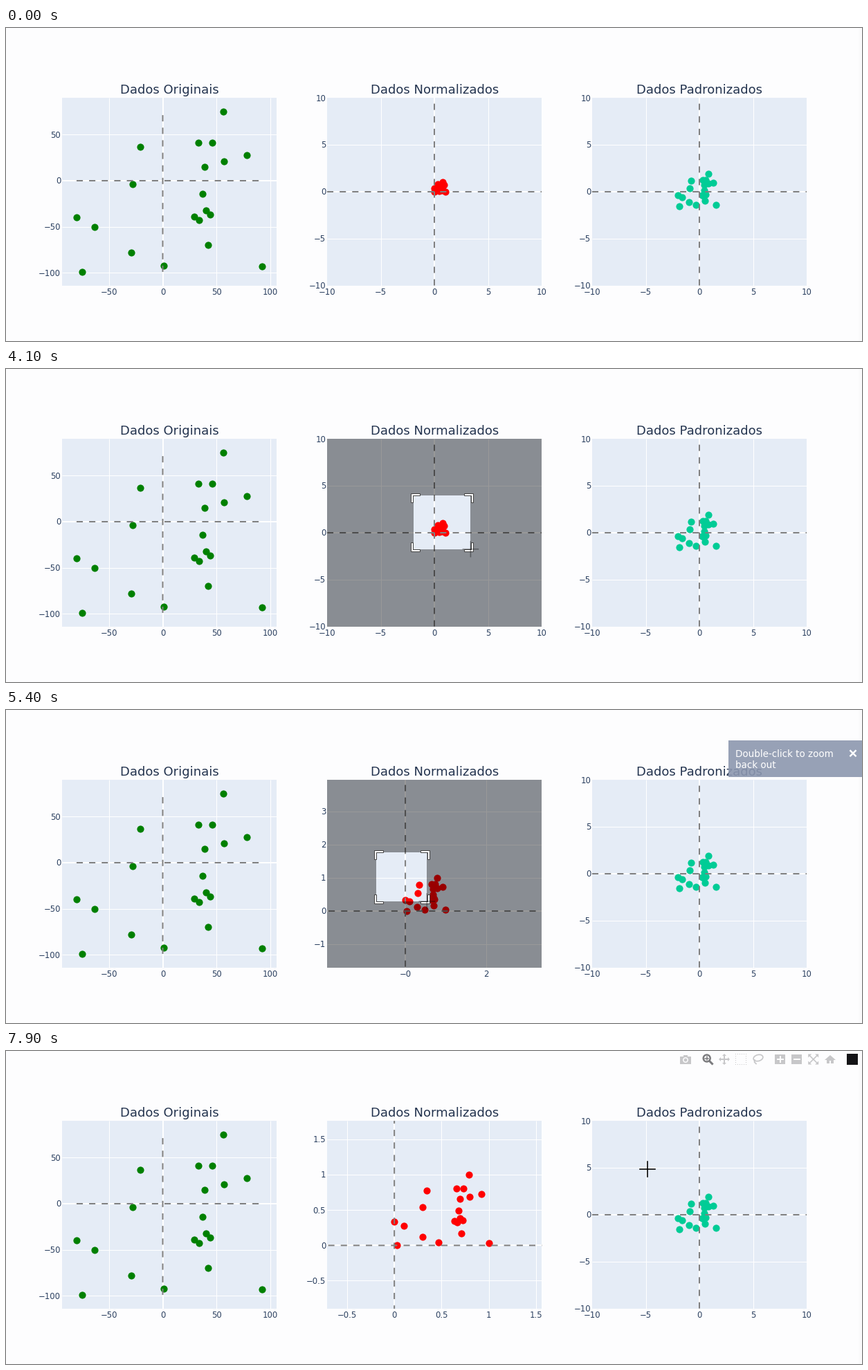
Write a matplotlib script that moves like this. It is 1237 by 453 pixels and loops after 8000 ms.

```python
import numpy as np
import matplotlib.pyplot as plt
from matplotlib.animation import FuncAnimation
from matplotlib.patches import Circle, Ellipse, PathPatch, Polygon, Rectangle
from matplotlib.path import Path

W, H, DPI = 1237, 453, 100
STEP, FRAMES = 100, 80
PT = 72 / DPI                      # points per pixel
TOP, BOTTOM, WIDTH = 101, 373, 311
HEIGHT = BOTTOM - TOP
LEFTS = (80.5, 463.5, 846.5)
MIDDLE = LEFTS[1]
DASH = 18.15
PAGE, TICK, TITLE = "#fdfdfe", "#2a3f5f", "#24344f"

# moments in ms
ENTER = 1400
DRAGS = ((2300, 4300), (4975, 6500))        # press and release
NOTICE_OUT = 6300
# cursor waypoints: time, x, y
PATH = np.array([
    (ENTER, 556, 410), (1800, 562.5, 239.5), (2300, 588.8, 183.3),
    (2500, 609, 212), (3100, 671, 263), (4300, 671.5, 260.2),
    (4975, 535.4, 206.2), (5100, 557, 228), (5750, 668.1, 334),
    (6500, 668.1, 334), (6900, 690, 410), (7400, 960, 330),
    (7800, 926, 175), (7900, 927, 171)])

plt.rcParams["font.family"] = "DejaVu Sans"
fig = plt.figure(figsize=(W / DPI, H / DPI), dpi=DPI, facecolor=PAGE)
ax = fig.add_axes([0, 0, 1, 1])
ax.set_xlim(0, W)
ax.set_ylim(H, 0)
ax.axis("off")


def ramp(t, start, end):
    return float(np.clip((t - start) / (end - start), 0, 1))


def cursor_at(t):
    return np.array([np.interp(t, PATH[:, 0], PATH[:, k]) for k in (1, 2)])


# ---------- drawing helpers ----------
def add(patch):
    ax.add_patch(patch)
    return patch


def box(x, y, w, h, color, z):
    return add(Rectangle((x, y), w, h, fc=color, ec="none", lw=0, zorder=z))


def line(xs, ys, color, width, z, **kw):
    return ax.plot(xs, ys, color=color, lw=width * PT, zorder=z, **kw)[0]


def text(x, y, s, px, color=TICK, ha="center", z=5):
    return ax.text(x, y, s, fontsize=px * PT, color=color, ha=ha,
                   va="baseline", zorder=z)


def fade(art, alpha):
    for a in art:
        a.set_alpha(alpha)
        a.set_visible(alpha > 0.005)


def label(value):
    return f"{value:g}".replace("-", "\u2212")


def ticks(low, high, step):
    slack = 0.02
    return step * np.arange(np.ceil(low / step - slack),
                            np.floor(high / step + slack) + 1)


def plot(left, points, color, origin, scale, steps, low, high):
    """Grid, dots, dashed axes and tick labels of one panel view."""
    (x0, y0), (sx, sy) = origin, scale
    right = left + WIDTH
    art = []

    def grid(xs, ys, value):
        art.append(line(xs, ys, "white", 2 if value == 0 else 1, 2,
                        solid_capstyle="butt"))

    for v in ticks((left - x0) / sx, (right - x0) / sx, steps[0]):
        x = x0 + sx * v
        if left + 2 < x < right - 2:
            grid([x, x], [TOP, BOTTOM], v)
        art.append(text(x, 386.3, label(v), 11.6))
    for v in ticks((y0 - BOTTOM) / sy, (y0 - TOP) / sy, steps[1]):
        y = y0 - sy * v
        if TOP + 2 < y < BOTTOM - 2:
            grid([left, right], [y, y], v)
        art.append(text(left - 1.3, y + 4.3, label(v), 11.6, ha="right"))

    art.append(line(x0 + sx * points[:, 0], y0 - sy * points[:, 1], color, 0, 3,
                    ls="none", marker="o", ms=10.2 * PT, mew=0, snap=False))

    # keep the dash phase of lines that begin outside the panel
    xa, xb = x0 + sx * low[0], min(x0 + sx * high[0], right)
    ya, yb = y0 - sy * low[1], max(y0 - sy * high[1], TOP)
    xa += max(0, (left - xa) // DASH) * DASH
    ya -= max(0, (ya - BOTTOM) // DASH) * DASH
    clip = Rectangle((left, TOP), WIDTH, HEIGHT, transform=ax.transData)
    for xs, ys in (([xa, xb], [y0, y0]), ([x0, x0], [ya, yb])):
        dashes = line(xs, ys, "gray", 2, 4, ls=(0, (DASH / 4, DASH / 4)),
                      snap=False)
        dashes.set_clip_path(clip)
        art.append(dashes)
    return art


# ---------- data and panels ----------
raw = np.array([
    (56, 75), (33, 41), (46, 41), (-21, 37), (78, 28), (57, 21), (39, 15),
    (-28, -4), (37, -14), (40, -32), (44, -37), (29, -39), (34, -43),
    (-80, -40), (-63, -50), (42, -70), (-29, -78), (1, -92), (92, -93),
    (-75, -99)], float)
normal = (raw - raw.min(0)) / np.ptp(raw, axis=0)
standard = (raw - raw.mean(0)) / raw.std(0)

box(W - 5, 0, 5, H, "#fafafb", 0)
for k, name in enumerate(("Originais", "Normalizados", "Padronizados")):
    box(LEFTS[k], TOP, WIDTH - 0.5, HEIGHT, "#e5ecf6", 1)
    text(236.8 + 382.4 * k, 95, "Dados " + name, 18, TITLE)

low, high = (-10, -10), (10, 10)
plot(LEFTS[0], raw, "green", (226.5, 221), (1.557, 1.333), (50, 50),
     raw.min(0), raw.max(0))
plot(LEFTS[2], standard, "#00cc96", (1002, 237), (15.5, 13.57), (5, 5), low, high)

# each drag enlarges its rectangle to the whole middle panel
corner, size = np.array([MIDDLE, TOP]), np.array([WIDTH, HEIGHT])
origin, scale = np.array([619, 237]), np.array([15.5, 13.57])
views = [plot(MIDDLE, normal, "red", origin, scale, (5, 5), low, high)]
for (press, release), steps in zip(DRAGS, ((2, 1), (0.5, 0.5))):
    start, end = cursor_at(press), cursor_at(release)
    zoom = size / (end - start)
    origin, scale = corner + (origin - start) * zoom, scale * zoom
    views.append(plot(MIDDLE, normal, "red", origin, scale, steps, low, high))


# ---------- toolbar and notice ----------
def toolbar():
    pale, active, y, z = "#c7c7c9", "#7b7b7e", 12, 8
    art = []

    def rect(cx, cy, w, h, color=pale):
        art.append(box(cx - w / 2, cy - h / 2, w, h, color, z))

    def fill(*points):
        art.append(add(Polygon(points, fc=pale, ec="none", lw=0, zorder=z)))

    def ring(shape, color, width):
        shape.set(fc="none", ec=color, lw=width * PT, zorder=z)
        art.append(add(shape))

    def stroke(xs, ys, width=2, color=pale):
        art.append(line(xs, ys, color, width, z))

    def plus(cx, cy, r, color, width, upright=True):
        stroke([cx - r, cx + r], [cy, cy], width, color)
        if upright:
            stroke([cx, cx], [cy - r, cy + r], width, color)

    # camera
    rect(982, y + 1, 15.5, 11)
    rect(982, y - 5, 6.5, 3)
    ring(Circle((982, y + 1), 3.2), PAGE, 1.5)
    # magnifier
    ring(Circle((1012.7, y - 1.5), 5), active, 2.4)
    stroke([1016.5, 1020.5], [y + 2.5, y + 6.5], 3, active)
    plus(1012.7, y - 1.5, 2.6, active, 1.5)
    # pan
    plus(1038, y, 5, pale, 2)
    for dx, dy in ((1, 0), (-1, 0), (0, 1), (0, -1)):
        fill((1038 + 8 * dx, y + 8 * dy),
             (1038 + 5 * dx + 3 * dy, y + 5 * dy + 3 * dx),
             (1038 + 5 * dx - 3 * dy, y + 5 * dy - 3 * dx))
    # box select and lasso
    for k in range(-2, 4):
        for side in (-7.5, 7.5):
            p = 3 * k - 1.5
            rect(1062 + p, y + side, 1.7, 1.7)
            rect(1062 + side, y + p, 1.7, 1.7)
    ring(Ellipse((1087, y - 2), 14, 9, angle=-15), pale, 1.7)
    stroke([1082, 1081.5, 1084], [y + 1, y + 4, y + 6.5], 1.7)
    # zoom in and out
    for cx, upright in ((1118.7, True), (1142.7, False)):
        rect(cx, y, 14.5, 14)
        plus(cx, y, 3.8, PAGE, 2, upright)
    # autoscale
    for sx in (-1, 1):
        stroke([1166.7 - 5 * sx, 1166.7 + 5 * sx], [y - 5, y + 5], 1.6)
        for sy in (-1, 1):
            x, tip = 1166.7 + 7.5 * sx, y + 7.5 * sy
            fill((x, tip), (x - 5 * sx, tip), (x, tip - 5 * sy))
    # home
    fill((1183, y + 1), (1191, y - 6), (1199, y + 1))
    rect(1191, y + 3, 10, 6)
    rect(1191, y + 4, 2.6, 4, PAGE)
    rect(1223, y, 16, 16, "#131316")
    return art


toolbar_art = toolbar()
notice_box = box(1044, 44, W - 1044, 53, "#8c97af", 8)
notice_text = [text(1054, 67.5 + 16.5 * k, s, 13.5, "white", "left", 9)
               for k, s in enumerate(("Double-click to zoom", "back out"))]
notice_text += [line([1220.3, 1227.7], [62.7 - d, 62.7 + d], "white", 2.4, 9)
                for d in (-3.7, 3.7)]

# ---------- zoom box and cursor ----------
UNIT = [(0, 0), (1, 0), (1, 1)]
shade = add(PathPatch(Path(UNIT), fc="black", ec="none", lw=0, zorder=6))
brackets = [add(Polygon(UNIT, fc="white", ec="#444444", lw=PT, zorder=7))
            for _ in range(4)]
cross = [line([0, 0], [0, 0], "black", 1.6, 10, snap=False) for _ in range(2)]
arrow = add(Polygon(UNIT, fc="white", ec="black", lw=PT, zorder=10))
ARROW = np.array([(0, 0), (0, 16), (4.5, 12), (11.5, 11.5)])


def rect_loop(l, t, r, b):
    return [(l, t), (r, t), (r, b), (l, b), (l, t)]


def set_zoom_box(l, t, r, b, strength):
    outer = rect_loop(MIDDLE, TOP, MIDDLE + WIDTH - 0.5, BOTTOM)
    hole = rect_loop(l, t, r, b)[::-1]
    codes = [Path.MOVETO] + [Path.LINETO] * 3 + [Path.CLOSEPOLY]
    shade.set_path(Path(outer + hole, codes * 2))
    arm = min(r - l, b - t, 20) // 2
    shape = np.array([(-3, arm), (0, arm), (0, 0), (arm, 0), (arm, -3), (-3, -3)])
    spots = ((l, t, 1, 1), (r, t, -1, 1), (r, b, -1, -1), (l, b, 1, -1))
    for bracket, (x, y, sx, sy) in zip(brackets, spots):
        bracket.set_xy((shape - 0.5) * (sx, sy) + (x, y))
    fade([shade], 0.4 * strength)
    fade(brackets, strength)


def set_cursor(x, y, alpha):
    in_plot = TOP <= y <= BOTTOM and any(l <= x <= l + WIDTH for l in LEFTS)
    cross[0].set_data([x - 11, x + 11], [y, y])
    cross[1].set_data([x, x], [y - 11, y + 11])
    arrow.set_xy(ARROW + (x, y))
    fade(cross, alpha * in_plot)
    fade([arrow], alpha * (not in_plot))


def toolbar_alpha(t):
    """The toolbar shows while the pointer moves and hides during a drag."""
    shows = [ENTER] + [release for _, release in DRAGS]
    hides = [press for press, _ in DRAGS] + [np.inf]
    for show, hide in zip(shows[::-1], hides[::-1]):
        if t >= show:
            gone = ramp(t, hide, hide + 400) if t > hide else 0
            return ramp(t, show, show + 300) * (1 - gone) ** 2
    return 0


def update(i):
    t = i * STEP
    current = sum(t >= release for _, release in DRAGS)
    for k, view in enumerate(views):
        for a in view:
            a.set_visible(k == current)

    fade(toolbar_art, toolbar_alpha(t))
    shown = ramp(t, DRAGS[0][1], DRAGS[0][1] + 500)
    shown *= 1 - ramp(t, NOTICE_OUT, NOTICE_OUT + 600)
    fade([notice_box], 0.9 * shown)
    fade(notice_text, shown)

    x, y = cursor_at(t)
    strength = 0
    fade([shade] + brackets, 0)
    for press, release in DRAGS:
        if press < t < release:
            strength = ramp(t, press + 100, press + 200) ** 2
            set_zoom_box(*cursor_at(press), x, y, strength)
    set_cursor(x, y, (t >= ENTER) * (1 - 0.65 * strength))
    return []


anim = FuncAnimation(fig, update, frames=FRAMES, interval=STEP,
                     init_func=lambda: update(0), repeat=True, repeat_delay=0,
                     blit=False)
plt.show()
```
